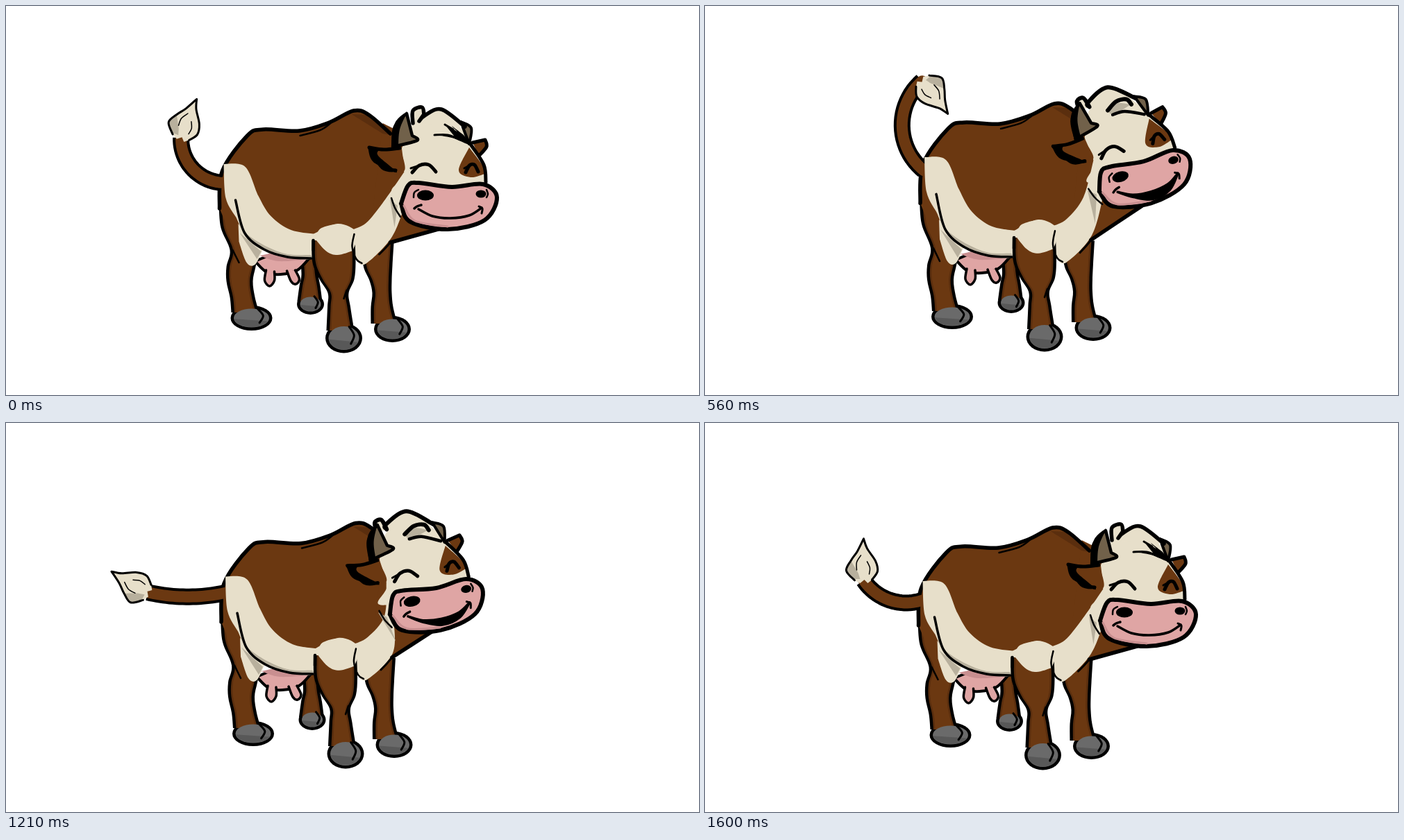
Recreate the animation shown at these times as an HTML page with a canvas. Size 998 by 561 pixels, loop 1730 ms.

```html
<!DOCTYPE html>
<html lang="en">
<head>
<meta charset="utf-8">
<title>Happy cow</title>
<style>
  html, body { margin: 0; width: 100%; height: 100%; overflow: hidden; background: #fff; }
  canvas { display: block; }
</style>
</head>
<body>
<canvas id="stage" width="998" height="561"></canvas>
<script>
const ctx = document.getElementById('stage').getContext('2d');
const BROWN = '#6b3811', DARK = '#5a2e0e', CREAM = '#e7dfca', SHADE = '#b8b09d';
const PINK = '#dfa5a4', ROSE = '#c98f90', HOOF = '#6a6a6a', HOOF_DARK = '#585858', HORN = '#71614a';
const LOOP = 1730, RAD = Math.PI / 180;

// head: x, y, upward turn; tail: root angle, curl, length, flick of the tuft
const REST = [639, 288, 0], NOD = [632, 284, .1];
const KEYS = [
  { t: 0,    head: REST,            tail: [180, 92, 101, 20] },
  { t: 200,  head: NOD,             tail: [175, 125, 125, 29] },
  { t: 560,  head: [636, 251, .28], tail: [219, 100, 147, 93] },
  { t: 820,  head: [625, 239, .38], tail: [210, 65, 112, 12] },
  { t: 1210, head: [622, 265, .2],  tail: [168, 25, 112, 17] },
  { t: 1470, head: NOD,             tail: [172, 46, 113, 14] },
  { t: 1600, head: REST,            tail: [160, 76, 98, 34] }
];

let pose;

function poseAt(t) {
  const i = KEYS.findLastIndex(k => k.t <= t);
  const a = KEYS[i], b = KEYS[i + 1] || a;
  const k = (t - a.t) / (b.t - a.t || 1);
  const mix = name => a[name].map((n, j) => n + (b[name][j] - n) * k);
  const [x, y, turn] = mix('head');
  return {
    x, y, turn,
    tail: mix('tail'),
    mouth: Math.min(1, turn * 4),
    lift: -45 * Math.max(0, turn - .1),
    settle: turn === 0 ? 1 : 0,
    raised: turn > .15
  };
}

const raw = (x, y) => [x, y];

// The back rises with the head while the legs stay planted.
function onBody(x, y) {
  const k = Math.max(0, Math.min(1, (360 - y) / 100));
  return [x - 2.5 * pose.settle, y + 2 * pose.settle + pose.lift * k];
}

function onHead(x, y) {
  const c = Math.cos(pose.turn), s = Math.sin(pose.turn);
  const u = x - REST[0], v = y - REST[1];
  return [pose.x + u * c + v * s, pose.y - u * s + v * c];
}

function curve(path, p) {
  for (let i = 0; i < p.length - 1; i++) {
    const a = p[i - 1] || p[i], b = p[i], c = p[i + 1], d = p[i + 2] || c;
    path.bezierCurveTo(b[0] + (c[0] - a[0]) / 6, b[1] + (c[1] - a[1]) / 6,
                       c[0] - (d[0] - b[0]) / 6, c[1] - (d[1] - b[1]) / 6, c[0], c[1]);
  }
}

// Smooth curve through points; "/" makes a corner, "h" pins a point to the head.
function trace(spec, map) {
  const path = new Path2D();
  let last;
  for (const run of spec.split('/')) {
    const p = run.trim().split(/\s+/).map(s => {
      const pinned = s[0] === 'h';
      return (pinned ? onHead : map)(...s.slice(pinned ? 1 : 0).split(',').map(Number));
    });
    if (last) p.unshift(last); else path.moveTo(...p[0]);
    curve(path, p);
    last = p[p.length - 1];
  }
  return path;
}

function fill(spec, color, map = onBody) {
  ctx.fillStyle = color;
  ctx.fill(trace(spec, map));
}

function ink(spec, width, map = onBody, color = '#000') {
  ctx.strokeStyle = color;
  ctx.lineWidth = width;
  ctx.stroke(trace(spec, map));
}

function shape(spec, color, width, map) {
  fill(spec, color, map);
  ink(spec, width, map);
}

function oval(x, y, rx, ry, color, from = 0, to = 2 * Math.PI) {
  ctx.fillStyle = color;
  ctx.beginPath();
  ctx.ellipse(x, y, rx, ry, 0, from, to);
  ctx.fill();
}

// A limb is a line of stations: x, y, half width.
function ribbon(stations, grow, color) {
  const side = sign => stations.map(([x, y, w]) => onBody(x + sign * (w + grow), y));
  const left = side(-1), right = side(1).reverse(), path = new Path2D();
  path.moveTo(...left[0]);
  curve(path, left);
  path.lineTo(...right[0]);
  curve(path, right);
  ctx.fillStyle = color;
  ctx.fill(path);
}

function leg(stations, cx, cy, rx, ry) {
  const [x, y] = onBody(cx, cy);
  ribbon(stations, 1, '#000');
  oval(x, y, rx + 1, ry + 1, '#000');
  ribbon(stations, -3.5, DARK);
  ribbon(stations, -6, BROWN);
  oval(x, y, rx - 3.5, ry - 3.5, HOOF);
  oval(x, y, rx - 4, ry - 4, HOOF_DARK, .35, Math.PI - .1);
  const at = (u, v) => `${x + u * rx},${y + v * ry}`;
  ink([at(.3, -.8), at(.58, -.2), at(.4, .4)].join(' '), 3, raw);
}

function tailArc() {
  const [root, curl, length] = pose.tail, steps = 24;
  let x = 315, y = 255 + pose.lift * 2.2;
  const points = [[x, y]];
  for (let i = 0; i < steps; i++) {
    const a = (root + curl * (i + .5) / steps) * RAD;
    points.push([x += Math.cos(a) * length / steps, y += Math.sin(a) * length / steps]);
  }
  return points;
}

function tailStroke(width, color, cap) {
  ctx.lineCap = cap;
  ctx.lineWidth = width;
  ctx.strokeStyle = color;
  ctx.beginPath();
  tailArc().forEach(p => ctx.lineTo(...p));
  ctx.stroke();
  ctx.lineCap = 'round';
}

function tuft() {
  const [root, curl, , flick] = pose.tail;
  const hair = '0,-13 14,-25 29,-18 42,-9 60,0 / 46,5 28,17 13,20 1,12';
  ctx.save();
  ctx.translate(...tailArc().pop());
  ctx.rotate((root + curl + flick) * RAD);
  fill(hair + ' / -4,6 / 1,1 / -4,-5 / 0,-13', CREAM, raw);
  fill('2,-13 14,-24 28,-18 / 11,-8 / 2,-5', SHADE, raw);
  ink(hair, 3, raw);
  ink('15,-10 26,-10 36,-4', 1.5, raw);
  ink('9,8 18,9 27,5', 1.5, raw);
  ctx.restore();
}

function farSide() {
  leg([[438, 360, 11], [440, 385, 11], [440, 402, 14], [440, 424, 17]], 441, 428, 18.5, 14);
  leg([[539, 340, 21], [538, 372, 20], [542, 394, 15], [544, 412, 13], [544, 432, 15], [547, 456, 18]], 559, 464, 25.5, 18);
  shape('361,366 378,382 398,385 422,379 440,361 / 400,350 / 361,366', PINK, 4);
  fill('368,358 395,366 440,363 / 405,350', ROSE);
  shape('377,379 375,394 382,402 389,394 389,381', PINK, 3.5);
  shape('407,380 413,395 420,399 425,392 419,379', PINK, 3.5);
}

const BACK = '310,290 314,236 350,185 373,176 425,178 468,166 503,149 525,155 556,182';
const BELLY = '333,278 346,325 374,349 408,360 442,362';

function body() {
  leg([[331, 285, 21], [335, 318, 22], [346, 350, 20], [341, 374, 20], [339, 395, 18], [343, 418, 17], [347, 440, 19]], 356, 448, 29, 17);
  fill(BACK + ' / 566,250 / 557,338 520,370 506,363 / 442,363 408,361 374,350 / 345,345 / 325,325', BROWN);
  fill('545,167 h585,190 / h622,322 / 558,338 / 530,300', BROWN);
  fill('337,312 / 372,350 / 361,371 349,368 338,338', CREAM);
  fill('339,325 / 370,352 / 364,363', SHADE);
  fill('500,154 545,182 / 556,184 / 523,155', DARK);
  ink(BACK, 5.5);
  ink('470,167 455,177 426,185', 2.5);
  ink('329,350 338,368', 2.5);
  tailStroke(16, BROWN, 'round');
}

function patches() {
  fill('316,226 347,230 366,272 384,301 413,321 450,327 / 457,318 480,313 500,321 / 521,311 545,282 h573,240 / h610,260 / h573,292 / 557,333 520,370 506,363 / 501,350 / 442,363 408,360 374,349 346,325 334,303 / 319,275 316,226', CREAM);
  fill('338,313 352,329 378,345 408,356 441,357 / 442,362 408,360 374,349 346,325', SHADE);
  fill('h553,279 h564,288 / 562,318', SHADE);
  ink('h555,277 h560,291 h568,304', 2.5);
  ink(BELLY, 3.5);
}

function nearFront() {
  leg([[474, 336, 30], [475, 368, 30], [479, 392, 24], [481, 412, 14], [482, 432, 15.5], [484, 466, 19]], 489, 477, 25.5, 20.5);
  fill('443,328 / 463,351 480,357 502,351 / 508,325 480,312 443,328', CREAM);
  ink('445,336 445,350', 4.5);
  ink('493,408 489,420', 2.5);
  ink('504,327 501,345 507,363 515,369', 2.5);
  ink('540,356 548,348 556,339', 3);
  ink('556,339 h622,322', 5.5);
}

function hair() {
  if (pose.raised) {
    shape('574,164 574,151 584,149 589,164 / 589,157 622,144 656,170', CREAM, 6, raw);
    fill('613,178 628,170 647,177 / 618,186', SHADE, raw);
    ink('613,176 628,167 643,168 648,177', 6, raw);
    ink('618,184 636,184 662,196', 4.5, raw);
  } else {
    shape('586,169 586,151 599,146 602,156 / 595,166 / 603,158 627,149 661,174', CREAM, 5.5, raw);
    fill('632,171 650,181 / 642,173 659,186 / 668,200 642,190 617,186 / 645,187 / 632,171', '#000', raw);
    ink('632,171 644,178', 3, raw);
    ink('617,186 636,186 652,192', 3, raw);
  }
}

function eye(x, w) {
  ink(`${x - w},240 ${x - w * .4},230 ${x + w * .4},229 ${x + w},239`, 5, raw);
  ink(`${x - w - 2},234 ${x - w * .2},229`, 3, raw);
}

function muzzle() {
  shape('569,285 579,259 594,255 642,261 687,257 707,276 689,309 636,322 582,311 569,285', PINK, 6, raw);
  ink('573,288 589,310 636,318', 3, raw, ROSE);
  oval(604, 273, 12, 7.5, '#000');
  oval(684, 271, 7.5, 5.5, '#000');
  ink('587,276 588,269 594,265', 2.5, raw);
  ink('692,265 694,271 692,276', 2.5, raw);
  const d = pose.mouth * 11;
  shape(`594,293 614,303 640,306 667,302 685,291 / 667,${302 + d * .8} 640,${306 + d} 614,${303 + d * .3} 594,293`, '#000', 3.5, raw);
  ink('588,292 592,289 598,287', 3.5, raw);
  ink('681,289 686,292 685,299', 3, raw);
}

function head() {
  ctx.save();
  ctx.translate(pose.x, pose.y);
  ctx.rotate(-pose.turn);
  ctx.translate(-REST[0], -REST[1]);

  shape('672,197 690,193 / 692,203 681,216', BROWN, 5, raw);
  fill('570,205 588,168 627,151 664,189 690,248 / 690,270 / 562,270 573,244 570,205', CREAM, raw);
  fill('667,204 688,232 690,242 / 669,247 652,237 667,204', BROWN, raw);
  ink('668,198 688,229 691,254', 5, raw);
  shape('655,167 670,176 667,199 / 655,167', HORN, 4, raw);
  hair();

  fill('523,204 568,206 / 573,238 534,224', BROWN, raw);
  ink('567,205 544,207 523,204 / 542,233 561,237', 5, raw);
  fill('521,202 538,207 / 536,216 563,240 529,225 521,202', '#000', raw);
  shape('557,203 562,170 577,155 / 585,187 / 592,194 557,203', HORN, 4.5, raw);
  fill('555,203 558,173 578,153 / 567,178 565,204', '#000', raw);

  eye(602, 17);
  eye(671, 9);
  muzzle();
  ctx.restore();
}

function draw(t) {
  // Each drawing is held: 200 ms, 100 ms, then 130 ms apiece.
  pose = poseAt(t < 200 ? 0 : t < 300 ? 200 : t - (t - 300) % 130);
  ctx.fillStyle = '#fff';
  ctx.fillRect(0, 0, 998, 561);
  ctx.lineCap = ctx.lineJoin = 'round';
  tailStroke(24, '#000', 'butt');
  farSide();
  body();
  patches();
  nearFront();
  tuft();
  head();
}

const start = performance.now();
function tick() {
  draw((performance.now() - start) % LOOP);
  requestAnimationFrame(tick);
}
tick();
</script>
</body>
</html>
```
